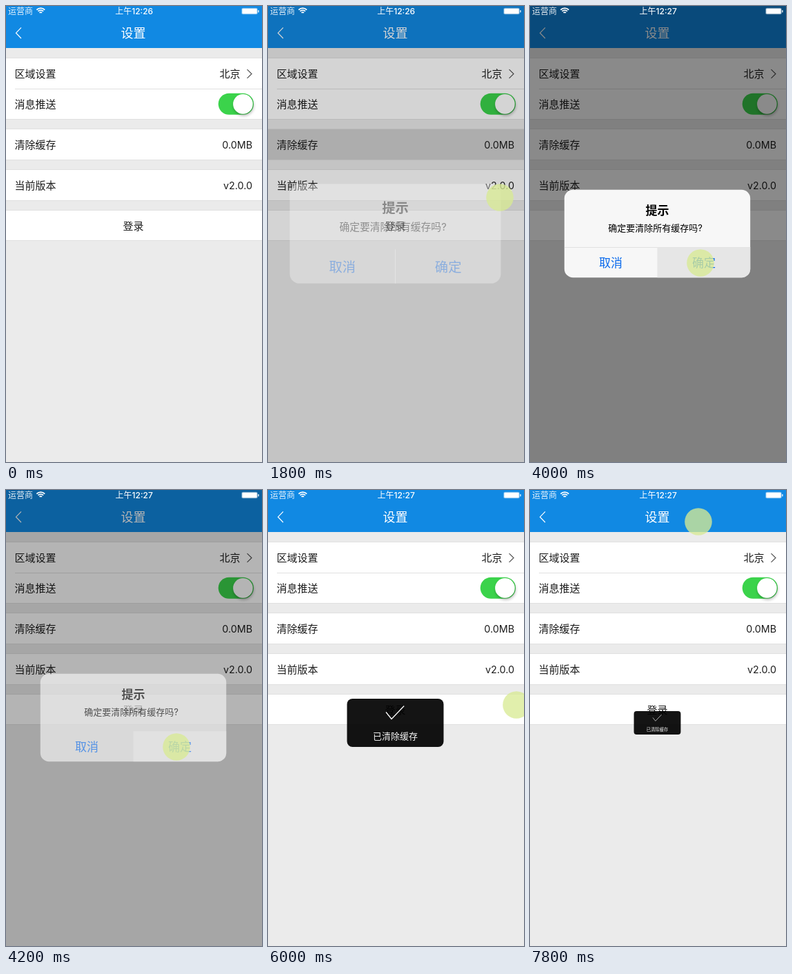
Write an HTML page with a canvas that moves like this. It is 371 by 662 pixels and loops after 8 s.

```html
<!DOCTYPE html>
<html lang="zh-CN">
<head>
<meta charset="utf-8">
<title>设置</title>
<style>
  html, body { margin: 0; width: 100%; height: 100%; overflow: hidden; background: #ebebeb; }
  canvas { display: block; width: 371px; height: 662px; }
</style>
</head>
<body>
<canvas id="stage"></canvas>
<script>
const W = 371, H = 662, CX = 184.5, LOOP = 8000, STEP = 200;
const FONT = 'Inter, "Noto Sans CJK SC", "Noto Sans CJK", sans-serif';
const INK = '#1c1c1c', EDGE = '#e0e0e0', BLUE = '#0869ec';
const FADE = 490, OPEN = 1600, PRESS = 3800, CLOSE = 4000;
const canvas = document.getElementById('stage');
const ratio = window.devicePixelRatio || 1;
canvas.width = W * ratio;
canvas.height = H * ratio;
const ctx = canvas.getContext('2d');

const progress = (t, from, length) => Math.min(1, Math.max(0, (t - from) / length));
const smooth = k => k * k * (3 - 2 * k);
const easeIn = k => k * k;
const easeOut = k => k * (2 - k);
const backIn = k => k * k * (3.09 * k - 2.09);
const bezier = (a, b, c, u) => a * (1 - u) ** 2 + 2 * b * u * (1 - u) + c * u * u;

// Each stroke of the pointer is a quadratic curve: start, bend, finish.
const strokes = [
  { begin: 200, length: 1000, hide: 1800, ease: smooth, x: [329, 318, 268], y: [138, 182, 210] },
  { begin: 1800, length: 1000, hide: 4300, ease: easeIn, x: [336, 321, 247], y: [278, 385, 373] },
  { begin: 6000, length: 1800, hide: LOOP, ease: easeOut, x: [360, 277, 244], y: [312, 122, 46] }
];

function rect(x, y, w, h, color) {
  ctx.fillStyle = color;
  ctx.fillRect(x, y, w, h);
}

function rounded(x, y, w, h, r, color) {
  ctx.beginPath();
  ctx.roundRect(x, y, w, h, r);
  ctx.fillStyle = color;
  ctx.fill();
}

function disc(x, y, r, color) {
  ctx.beginPath();
  ctx.arc(x, y, r, 0, Math.PI * 2);
  ctx.fillStyle = color;
  ctx.fill();
}

function line(points, color, width) {
  ctx.beginPath();
  points.forEach(([x, y]) => ctx.lineTo(x, y));
  ctx.strokeStyle = color;
  ctx.lineWidth = width;
  ctx.stroke();
}

// A negative width points the tip to the left.
function chevron(x, y, w, h, color, width) {
  line([[x, y - h], [x + w, y], [x, y + h]], color, width);
}

// The y coordinate is the visual middle of the glyphs.
function text(str, x, y, size, color, align = 'left', weight = 400) {
  ctx.font = `${weight} ${size}px ${FONT}`;
  ctx.textAlign = align;
  ctx.fillStyle = color;
  ctx.fillText(str, x, y + size * .38);
}

function scaleAbout(x, y, scale) {
  ctx.translate(x, y);
  ctx.scale(scale, scale);
}

function drawHeader() {
  rect(0, 0, W, 61, '#1189e3');
  chevron(22, 39.2, -7.5, 7.8, '#fff', 1.2);
  text('设置', CX, 39.5, 18, '#fff', 'center', 500);
}

function drawSwitch() {
  rounded(307.7, 126.8, 51.3, 31, 15.5, '#3bd34b');
  ctx.save();
  ctx.shadowColor = 'rgba(0,0,0,.3)';
  ctx.shadowBlur = 4 * ratio;
  ctx.shadowOffsetX = ratio;
  ctx.shadowOffsetY = 2.5 * ratio;
  disc(343.4, 142.4, 14.3, '#fff');
  ctx.restore();
}

function drawPanel(y, h, color = '#fff') {
  rect(0, y - 1, W, h + 2, EDGE);
  rect(0, y, W, h, color);
}

function drawRow(y, label, value = '', right = 357, size = 14.3) {
  text(label, 12.5, y, 15, INK);
  text(value, right, y, size, INK, 'right');
}

function drawList(pressed) {
  rect(0, 61, W, H - 61, '#ebebeb');
  drawPanel(76, 88);
  drawPanel(179, 44, pressed ? '#d0d0d0' : '#fff');
  drawPanel(238, 44);
  drawPanel(297, 43);
  rect(13, 120, W - 13, 1, EDGE);
  drawRow(98.5, '区域设置', '北京', 339.5, 15);
  drawRow(142.5, '消息推送');
  drawRow(201.3, '清除缓存', '0.0MB');
  drawRow(260.3, '当前版本', 'v2.0.0');
  text('登录', CX, 319.5, 15, INK, 'center');
  chevron(349.5, 98.5, 6.5, 6.3, '#4c4c4c', 1.1);
  drawSwitch();
}

function drawStatus(t) {
  text('运营商', 3, 7.5, 12, 'rgba(255,255,255,.88)');
  for (let r = 2.4; r < 9; r += 3) {
    ctx.beginPath();
    ctx.arc(50.3, 11.5, r, -Math.PI * .75, -Math.PI * .25);
    ctx.strokeStyle = '#fff';
    ctx.lineWidth = 1.8;
    ctx.stroke();
  }
  text(t < 2200 ? '上午12:26' : '上午12:27', 185.7, 7.5, 12, '#fff', 'center', 500);
  rounded(341.3, 2.8, 23.4, 9.4, 2, 'rgba(255,255,255,.4)');
  rounded(342.3, 3.8, 21.4, 7.4, 1.2, '#fff');
  rounded(365.2, 6, 1.3, 3.4, .6, '#fff');
}

function drawAlert(t, show) {
  ctx.save();
  ctx.globalAlpha = show;
  scaleAbout(CX, 330.5, t < CLOSE ? 1 + .213 * (1 - show) : 1);
  rounded(-134.7, -63.7, 269.4, 127.4, 12.5, '#f7f7f7');
  rect(-134.7, 19.5, 269.4, .7, '#d9d9d9');
  if (t < PRESS) rect(-.5, 20, .8, 43.7, '#fff');
  else rounded(0, 19.7, 134.7, 44, [0, 0, 12.5, 0], '#e6e6e6');
  text('提示', 0, -33.5, 17, '#000', 'center', 700);
  text('确定要清除所有缓存吗?', -3, -8.5, 13, '#000', 'center');
  text('取消', -67.5, 42.5, 17, BLUE, 'center');
  text('确定', 67.5, 42.5, 17, BLUE, 'center', 500);
  ctx.restore();
}

function drawHud(t) {
  const black = 'rgba(0,0,0,.92)';
  const settle = .08 * (1 - progress(t, 5400, 200));
  const shrink = .515 * backIn(progress(t, 7400, 400));
  ctx.save();
  scaleAbout(CX, 338, 1 + settle - shrink);
  if (t < 5400) {
    ctx.globalAlpha = progress(t, 4800, 400);
    rounded(-46, -46, 92, 92, 8, black);
  } else {
    rounded(-70, -35, 140, 70, 8, black);
    line([[-13.5, -15.5], [-5.5, -5.5], [12.7, -24.5]], '#fff', 1.3);
    text('已清除缓存', 0, 19.5, 13, '#f2f2f2', 'center');
  }
  ctx.restore();
}

function drawPointer(t) {
  const stroke = strokes.find(s => t >= s.begin && t < s.hide);
  if (!stroke) return;
  const u = stroke.ease(progress(t, stroke.begin, stroke.length));
  disc(bezier(...stroke.x, u), bezier(...stroke.y, u), 19.8, 'rgba(217,235,147,.77)');
}

function render(t) {
  const show = smooth(progress(t, OPEN, FADE)) * (1 - smooth(progress(t, CLOSE, FADE)));
  ctx.setTransform(ratio, 0, 0, ratio, 0, 0);
  drawHeader();
  drawList(t >= 1800 && t < 2200);
  rect(0, 0, W, H, `rgba(0,0,0,${.46 * show})`);
  drawStatus(t);
  if (show > 0) drawAlert(t, show);
  if (t >= 5000) drawHud(t);
  drawPointer(t);
}

// The picture advances in whole steps, like a screen recording.
const start = performance.now();
function tick() {
  const t = (performance.now() - start) % LOOP;
  render(Math.floor(t / STEP) * STEP);
  requestAnimationFrame(tick);
}
tick();
</script>
</body>
</html>
```
